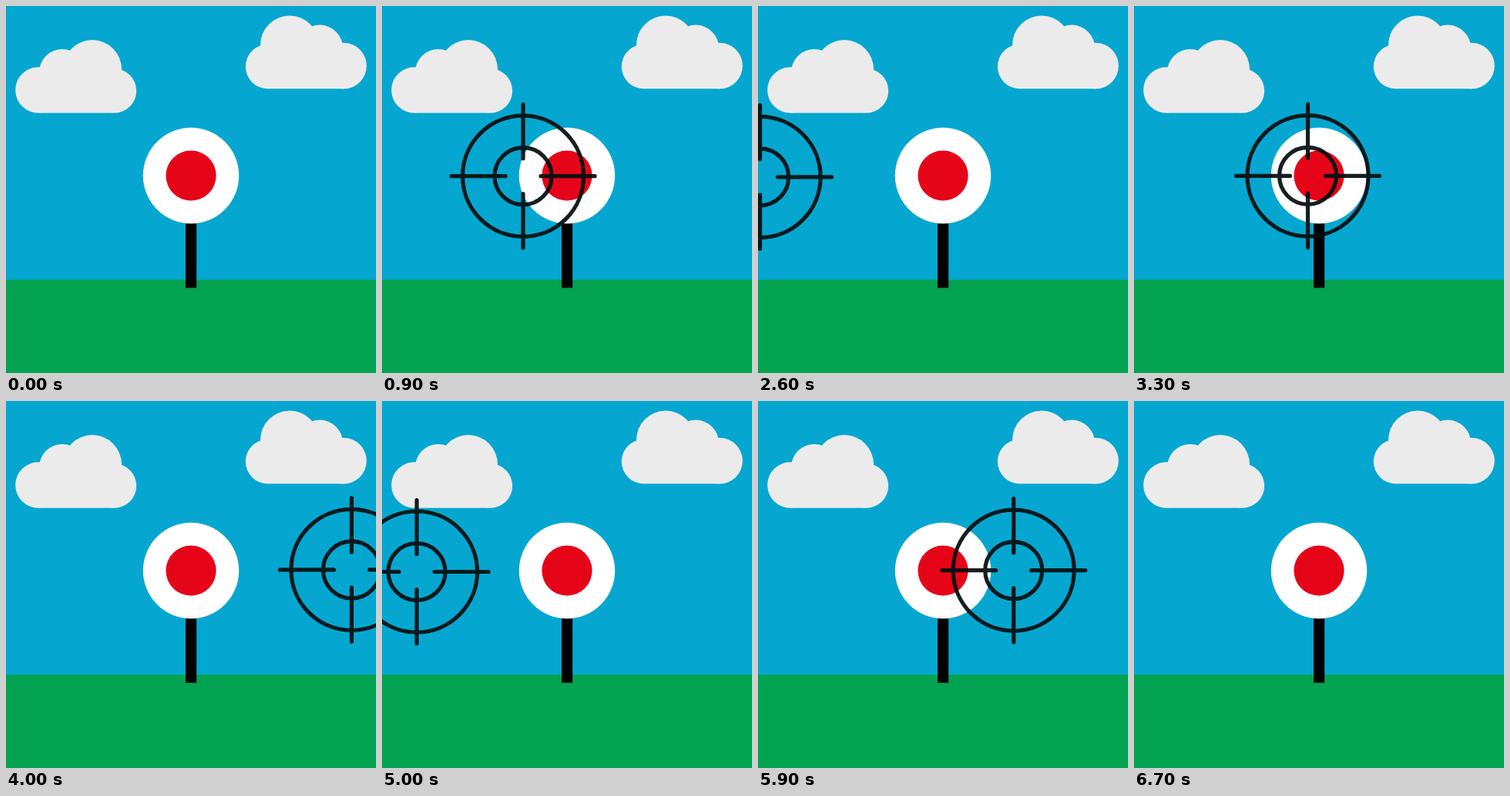
Animation of 480x476 px, one loop 6.8 s. Source, as an HTML page with a canvas:

```html
<!DOCTYPE html>
<html lang="en">
<head>
<meta charset="utf-8">
<title>Target practice</title>
<style>
html, body { margin: 0; width: 100%; height: 100%; overflow: hidden; }
canvas { display: block; width: 480px; height: 476px; }
</style>
</head>
<body>
<canvas id="stage" width="480" height="476"></canvas>
<script>
const ctx = document.getElementById('stage').getContext('2d');
const LOOP = 6800, PASS = LOOP / 3, STEP = 100;

function disc(x, y, r, color) {
  ctx.fillStyle = color;
  ctx.beginPath();
  ctx.arc(x, y, r, 0, Math.PI * 2);
  ctx.fill();
}

function rect(x, y, w, h, color) {
  ctx.fillStyle = color;
  ctx.fillRect(x, y, w, h);
}

// dir = -1 mirrors the cloud; x is its outer edge on the low side
function cloud(x, y, dir) {
  const color = '#ebebeb';
  ctx.save();
  ctx.translate(x, y);
  ctx.scale(dir, 1);
  disc(30, 65, 29.8, color);
  disc(61, 42, 30, color);
  disc(100, 38, 38, color);
  disc(128.5, 66, 28.7, color);
  rect(30, 45, 98, 49.7, color);
  ctx.restore();
}

function scene() {
  rect(0, 0, 480, 476, '#05a7d0');
  rect(0, 355, 480, 121, '#03a351');
  cloud(12, 44, 1);
  cloud(468, 12.6, -1);
  rect(233, 275, 14.2, 90.5, '#000');
  disc(240, 220, 62.2, '#fff');
  disc(240, 220, 32.6, '#e60518');
}

function crosshair(x, y) {
  ctx.save();
  ctx.translate(x, y);
  ctx.strokeStyle = 'rgba(5, 14, 14, 0.93)';
  ctx.lineWidth = 5.2;
  ctx.lineCap = 'round';
  // one path, so overlapping strokes keep an even tone
  ctx.beginPath();
  for (const r of [37, 78.5]) {
    ctx.moveTo(r, 0);
    ctx.arc(0, 0, r, 0, Math.PI * 2);
  }
  for (const s of [-1, 1]) {
    ctx.moveTo(s * 23, 0);
    ctx.lineTo(s * 93, 0);
    ctx.moveTo(0, s * 23);
    ctx.lineTo(0, s * 93);
  }
  ctx.stroke();
  ctx.restore();
}

function draw(now) {
  const t = Math.floor((now % LOOP) / STEP) * STEP;
  const x = -103.5 + 0.3184 * (t % PASS);
  scene();
  crosshair(x, 221.8 - 0.0064 * x);
}

const start = performance.now();
function tick() {
  draw(performance.now() - start);
  requestAnimationFrame(tick);
}
tick();
</script>
</body>
</html>
```
